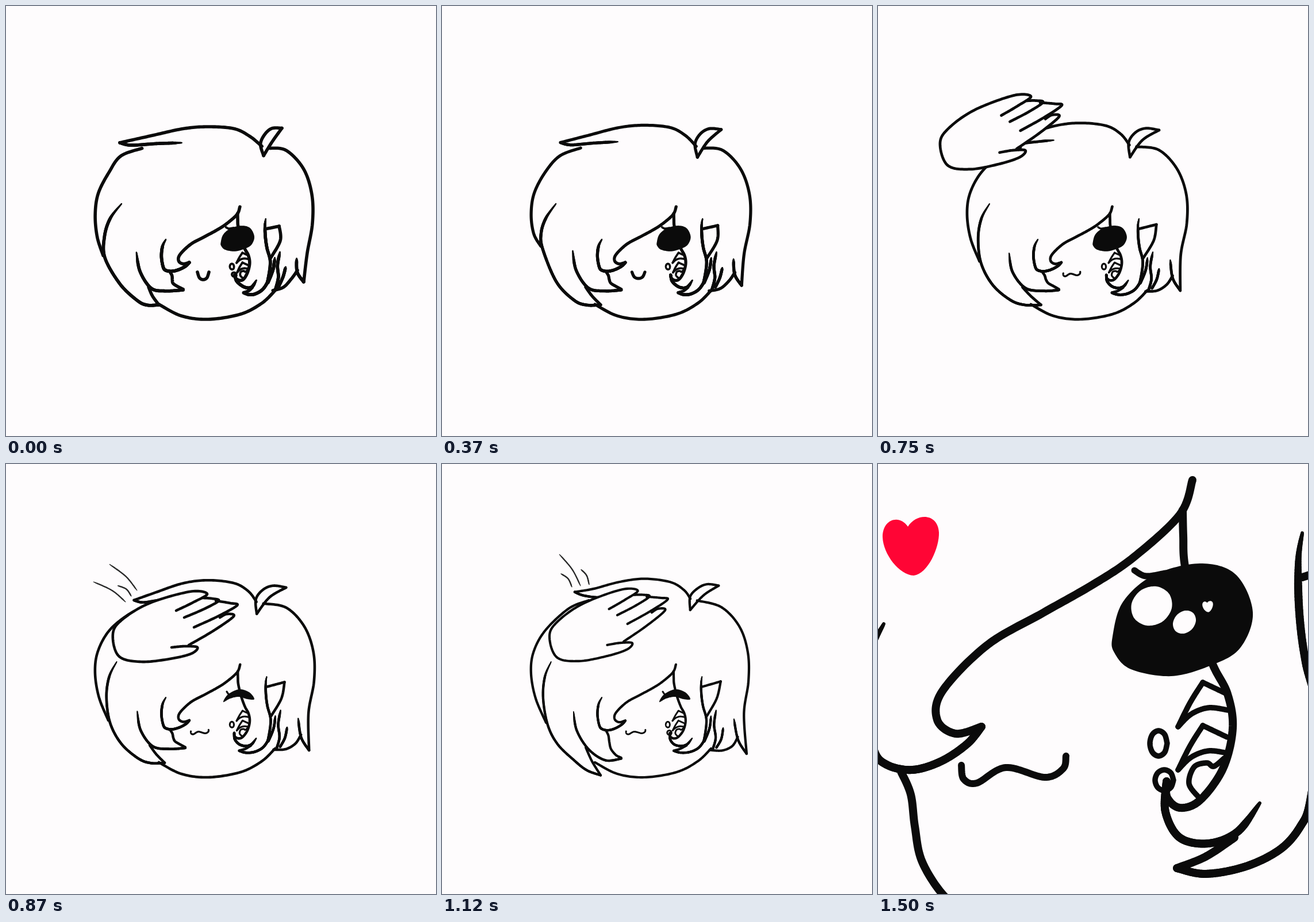
Animation of 748x748 px, one loop 2.12 s. Source, as an HTML page with a canvas:

```html
<!DOCTYPE html>
<html lang="en">
<head>
<meta charset="utf-8">
<title>Head pat</title>
<style>
html, body { margin: 0; width: 100%; height: 100%; overflow: hidden; background: #fefcfd; }
canvas { display: block; }
</style>
</head>
<body>
<canvas id="stage" width="748" height="748"></canvas>
<script>
const ctx = document.getElementById('stage').getContext('2d');
const INK = '#0b0b0b', PAPER = '#fefcfd', LOOP = 2120;
const STEPS = [0, 120, 250, 370, 500, 620, 750, 870, 1000, 1120, 1250, 1370, 1500];

const clamp = (v, lo = 0, hi = 1) => Math.min(hi, Math.max(lo, v));
const hat = (p, c) => Math.max(0, 1 - Math.abs(p - c));
const sway = p => Math.cos(p - 2.2);
const mapPoints = (pts, f) => {
  const out = [];
  for (let i = 0; i < pts.length; i += 2) out.push(...f(pts[i], pts[i + 1]));
  return out;
};

// Catmull-Rom curve through flat x,y points
function curve(p, closed) {
  const n = p.length / 2, out = [], spans = closed ? n : n - 1;
  const at = (i, c) => p[2 * (closed ? (i + n) % n : clamp(i, 0, n - 1)) + c];
  const mix = (i, t, c) => {
    const a = at(i - 1, c), b = at(i, c), d = at(i + 1, c), e = at(i + 2, c);
    return b + t / 2 * (d - a + t * (2 * a - 5 * b + 4 * d - e + t * (3 * (b - d) + e - a)));
  };
  for (let i = 0; i < spans; i++)
    for (let t = 0; t < 1; t += 1 / 16) out.push([mix(i, t, 0), mix(i, t, 1)]);
  if (!closed) out.push([at(n - 1, 0), at(n - 1, 1)]);
  return out;
}

function trace(pts) {
  ctx.beginPath();
  pts.forEach(([x, y]) => ctx.lineTo(x, y));
}

// ends: 's' thins the start, 'e' thins the end
function line(p, w, ends = '') {
  const pts = curve(p), last = pts.length - 1;
  ctx.lineWidth = w;
  if (!ends) { trace(pts); ctx.stroke(); return; }
  for (let i = 0; i < last; i++) {
    const u = (i + .5) / last;
    const s = ends.includes('s') ? .4 + u * 4 : 1, e = ends.includes('e') ? .4 + (1 - u) * 4 : 1;
    ctx.lineWidth = w * Math.min(1, s, e);
    trace([pts[i], pts[i + 1]]);
    ctx.stroke();
  }
}

function blob(p, color = INK) {
  trace(curve(p, true));
  ctx.fillStyle = color;
  ctx.fill();
}

function oval(x, y, rx, ry, rot = 0) {
  const pts = [];
  for (let i = 0; i <= 8; i++) {
    const a = i * Math.PI / 4, c = rx * Math.cos(a), s = ry * Math.sin(a);
    pts.push(x + c * Math.cos(rot) - s * Math.sin(rot), y + c * Math.sin(rot) + s * Math.cos(rot));
  }
  return pts;
}

function heart(x, y, s, color) {
  ctx.save();
  ctx.translate(x, y);
  ctx.scale(s, s);
  ctx.beginPath();
  ctx.moveTo(-5, -34);
  ctx.bezierCurveTo(-20, -56, -49, -47, -49, -16);
  ctx.bezierCurveTo(-48, 14, -20, 50, 5, 51);
  ctx.bezierCurveTo(30, 48, 50, 2, 49, -24);
  ctx.bezierCurveTo(47, -58, 10, -58, -5, -34);
  ctx.fillStyle = color;
  ctx.fill();
  ctx.restore();
}

// Places where the drawing is tugged; p runs from 0 to 5 over the shot
const pull = (x, y, r, move) => ({ x, y, r, move });
const pulls = [
  pull(222, 230, 40, p => [8.2 * p - 24, 7 - 14 * Math.max(0, p - 3)]),          // tuft
  pull(352, 203, 90, p => [0, 7 - 2.6 * p]),                                     // crown
  pull(436, 258, 25, p => [9 - 2.8 * p, 5 * sway(p)]),                           // leaf stem
  pull(483, 213, 25, p => [6 * sway(p), 3 * sway(p)]),                           // leaf tip
  pull(176, 444, 40, p => [3 * p - 7, 4 * p - 10 - 20 * hat(p, 1)]),             // back hair
  pull(195, 344, 25, p => [6 - 2.8 * p, 0]),                                     // left strand
  pull(276, 537, 40, p => [15 * hat(p, 2) - 10 * hat(p, 0), 9 * hat(p, 4) - 8 * clamp(4 - p)]),
  pull(312, 521, 40, p => [0, -12 * Math.min(2, 5 - p)]),                        // left lock
  pull(448, 242, 30, p => [5 - 2 * p, 5 - 2 * p]),                               // parting
  pull(535, 350, 90, p => [5 - 3 * Math.abs(p - 2), 0]),                         // right side
  pull(524, 490, 40, p => [3 * p - 6 - 10 * hat(p, 5), 6 * p - 10 - 28 * hat(p, 5)]),
  pull(400, 503, 25, p => [13 - 2.6 * p, -4]),                                   // cheek lock
  pull(488, 377, 20, p => [2.4 * p - 12, 6 - 1.2 * p])                           // ear
];

function warp(x, y, p) {
  let dx = 0, dy = 0;
  for (const a of pulls) {
    const k = Math.exp(-((x - a.x) ** 2 + (y - a.y) ** 2) / a.r ** 2), [mx, my] = a.move(p);
    dx += k * mx;
    dy += k * my;
  }
  return [x + dx, y + dy];
}

// The face is drawn at close-up size; place() puts it on the stage
function drawFace(place, w, lowRing) {
  const pen = (pts, k = 1, ends = '') => line(mapPoints(pts, place), w * k, ends);
  const thin = .68;
  // chevrons on the cheek
  for (const y of [0, 75]) {
    pen([522, 457 + y, 543, 415 + y, 565, 380 + y], thin);
    pen([565, 380 + y, 607, 400 + y], thin);
    pen([522, 457 + y, 545, 435 + y, 575, 424 + y, 608, 428 + y], thin);
  }
  pen([558,580, 541,556, 550,527, 572,520, 584,526, 602,512], thin);
  pen(oval(488, 486, 15, 22), thin);
  if (lowRing) pen(oval(498, 550, 16, 18), thin);
  // fringe
  pen([180,457, 135,469, 103,445, 112,395, 190,315, 287,259, 375,209, 445,162, 525,88, 547,28]);
  pen([10,278, -14,330, -22,410, -8,495, 15,523, 60,532, 110,517, 155,487, 180,457], 1, 's');
  // cheeks
  pen([40,535, 57,575, 64,630, 76,690, 112,748, 150,776]);
  pen([530,80, 531,125, 534,178, 555,270, 582,348, 608,400, 617,460, 600,530, 560,585, 525,598, 503,580, 502,552]);
  pen([502,552, 500,605, 525,650, 575,660, 625,640, 664,590], 1, 'e');
  pen([620,650, 570,683, 520,703]);
  // strand and ear
  pen([738,120, 731,170, 733,260, 744,345, 768,450, 752,585, 735,630, 700,670, 640,700, 570,713, 520,703], 1, 's');
  pen([738,197, 884,151]);
  pen([884,151, 845,285, 772,418]);
}

const MOUTH = [145,524, 149,548, 172,555, 222,528, 290,545, 322,530, 327,508];
const EYE = [408,300, 426,240, 480,193, 560,173, 622,192, 652,258, 630,320, 580,350, 510,369, 440,357, 411,328];
const LASH = [446,185, 466,195, 500,190];

function drawHair(p, w) {
  const pen = (pts, ends) => line(mapPoints(pts, (x, y) => warp(x, y, p)), w, ends);
  // crown, tuft, back
  pen([222,230, 260,221, 308,208, 352,203, 397,208, 422,222, 436,239]);
  pen([222,230, 238,235, 268,235, 306,233], 'e');
  pen([250,242, 215,256, 180,289, 160,326, 155,363, 161,405, 176,444]);
  // left side
  pen([195,344, 180,370, 174,405, 179,448, 200,486, 230,514, 252,528, 276,537], 's');
  pen([228,430, 234,463, 255,495, 284,516, 312,521], 's');
  pen([250,492, 261,514, 276,537]);
  // right side
  pen([448,242, 487,250, 518,283, 533,328, 534,378, 525,432, 524,490]);
  pen([507,441, 511,470, 524,490], 's');
  pen([465,496, 485,493, 501,481, 511,466]);
  pen([477,428, 473,452, 475,474, 470,494], 's');
  pen([468,438, 466,455, 462,468, 456,482], 's');
  pen([488,456, 484,474, 476,490], 's');
  // leaf
  pen([436,258, 435,235, 447,219, 463,211, 483,213]);
  pen([483,213, 458,232, 436,258]);
  // chin
  line([266,519, 305,539, 352,545, 408,536, 445,517, 468,495], w);
}

function drawMouth(p, w) {
  if (p < 2.5) {
    const half = 10 + 1.2 * p, deep = 13 - 2 * p, x = 343 - 1.3 * p;
    line([x - half, 463, x - half * .65, 463 + deep * .75, x, 463 + deep, x + half * .65, 463 + deep * .75, x + half, 463], w);
  } else {
    const k = .17 + .015 * (p - 3);
    line(mapPoints(MOUTH, (x, y) => [337 + (x - 236) * k, 466 + (y - 530) * .16]), w * .7);
  }
}

function drawEye(p, place, w) {
  if (p < 3) {
    blob(mapPoints(EYE, place));
    line(mapPoints(LASH, place), w * .7);
  } else {
    blob([378,414, 386,401, 405,392, 423,397, 432,409, 420,409, 405,405, 390,408]);
    line([384,396, 388,401, 394,402], w * .7);
  }
}

function finger(kx, ky, tx, ty, gx, gy) {
  return [kx, ky, tx - 12, ty - 4, tx, ty, (tx + gx) / 2 + 4, (ty + gy) / 2, gx, gy];
}

// Points are measured from the wrist
const HAND = [
  [92,-15, 116,-17, 137,-15, 126,-4, 89,5, 39,10, 0,0, -10,-39, 7,-64, 54,-92, 124,-112, 154,-108, 129,-93, 100,-79],
  finger(146, -101, 174, -96, 114, -67),
  finger(169, -96, 206, -88, 131, -50),
  finger(176, -67, 200, -69, 122, -19)
];

function drawHand(p, w) {
  const fly = clamp(p - 2), rub = Math.max(0, p - 3);
  const shapes = HAND.map(s => curve(s));
  ctx.save();
  ctx.translate(46 + 150 * fly - 6.5 * rub + 10 * Math.sin(rub * Math.PI / 2), 220 + 114 * fly + 2 * rub);
  ctx.rotate((-9 * (1 - fly) - 4.3 * rub) * Math.PI / 180);
  ctx.scale(1 - .03 * rub, 1 - .03 * rub);
  trace(shapes.flat());
  ctx.fillStyle = PAPER;
  ctx.fill();
  HAND.forEach(s => line(s, w));
  ctx.restore();
}

function drawRays() {
  let seed = 7;
  const rnd = () => (seed = seed * 16807 % 2147483647) / 2147483647;
  for (let i = 0; i < 21; i++) {
    const a = (i + .4 * rnd()) * 2 * Math.PI / 21, c = Math.cos(a), s = Math.sin(a);
    const len = 20 + 18 * rnd(), x = 138 + 110 * c, y = 151 + 82 * s;
    line([x, y, x + len * c, y + len * s], 2, 'se');
  }
}

function drawSwoosh(p) {
  const q = clamp(p - 3);
  for (let i = 0; i < 3; i++) {
    const x = 208 + 10 * i + q * (18 + 5 * i), y = 240 - 10 * i + q * (8 * i - 26);
    const len = 48 + 18 * Math.cos(3.14 * (i + q)), a = .56 + .32 * q + .1 * i;
    const dx = len * Math.cos(a), dy = len * Math.sin(a);
    line([x - dx, y - dy, x - dx * .45 + 2, y - dy * .45 - 4, x, y], 2.2, 'se');
  }
}

function drawHead(p) {
  const w = 5.6 - .34 * p;
  const place = (x, y) => warp(407 + (x - 547) * .24, 349 + (y - 28) * .228, p);
  drawFace(place, w, p < .5 || p > 3.5);
  drawHair(p, w);
  drawMouth(p, w);
  drawEye(p, place, w);
  if (p < 2) return;
  drawHand(p, w);
  ctx.strokeStyle = '#2b2b2b';
  if (p === 2) drawRays();
  if (p >= 3) drawSwoosh(p);
}

function drawCloseUp() {
  drawFace((x, y) => [x, y], 14, true);
  line(MOUTH, 12);
  blob(EYE);
  line(LASH, 11);
  blob(oval(476, 247, 37, 33, -.6).slice(0, -2), PAPER);
  blob(oval(533, 275, 22, 18, -.8).slice(0, -2), PAPER);
  heart(573.5, 248, .19, PAPER);
  heart(57, 143, 1, '#ff0535');
}

let shown = -1;
function tick(now) {
  const t = now % LOOP;
  const k = STEPS.filter(s => s <= t).length - 1;
  if (k !== shown) {
    shown = k;
    ctx.fillStyle = PAPER;
    ctx.fillRect(0, 0, 748, 748);
    ctx.strokeStyle = INK;
    ctx.lineCap = ctx.lineJoin = 'round';
    if (k === 12) drawCloseUp();
    else drawHead(k < 3 ? k / 3 : (k - 1) / 2);
  }
  requestAnimationFrame(tick);
}
tick(0);
</script>
</body>
</html>
```
